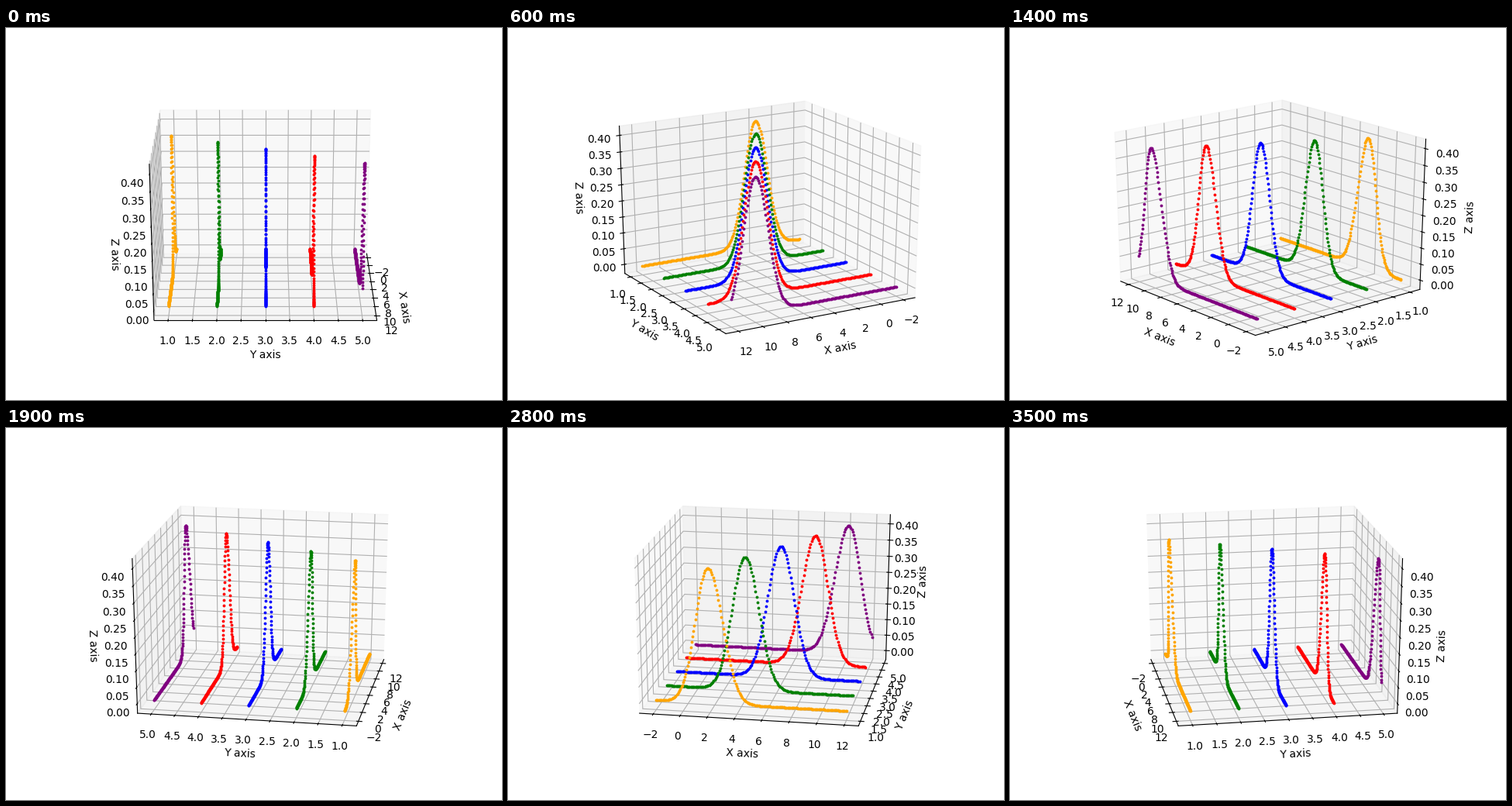
Recreate the animation shown at these times as a matplotlib script. Size 640 by 480 pixels, loop 3600 ms.

```python
import numpy as np
import matplotlib.pyplot as plt
from matplotlib.animation import FuncAnimation

FRAMES = 36
COLORS = ["orange", "green", "blue", "red", "purple"]


def normal_pdf(x, mean):
    return np.exp(-(x - mean) ** 2 / 2) / np.sqrt(2 * np.pi)


fig = plt.figure(figsize=(6.4, 4.8), dpi=100)
ax = fig.add_subplot(projection="3d")
# Unit cube that fills the whole, non-square subplot area
ax.set_box_aspect((1, 1, 1), zoom=np.sqrt(3) / 1.8294640721620434)
ax.apply_aspect = lambda position=None: None
ax.margins(0.05)

x = np.linspace(-2, 12, 200)
for row, color in enumerate(COLORS, start=1):
    ax.scatter(x, np.full_like(x, row), normal_pdf(x, 2 * row),
               color=color, s=3, depthshade=False)

ax.set_xlabel("X axis")
ax.set_ylabel("Y axis")
ax.set_zlabel("Z axis")


def rotate(i):
    ax.view_init(elev=22, azim=360 * i / FRAMES)
    return []


anim = FuncAnimation(fig, rotate, frames=FRAMES, interval=100,
                     repeat=True, repeat_delay=0)
plt.show()
```
